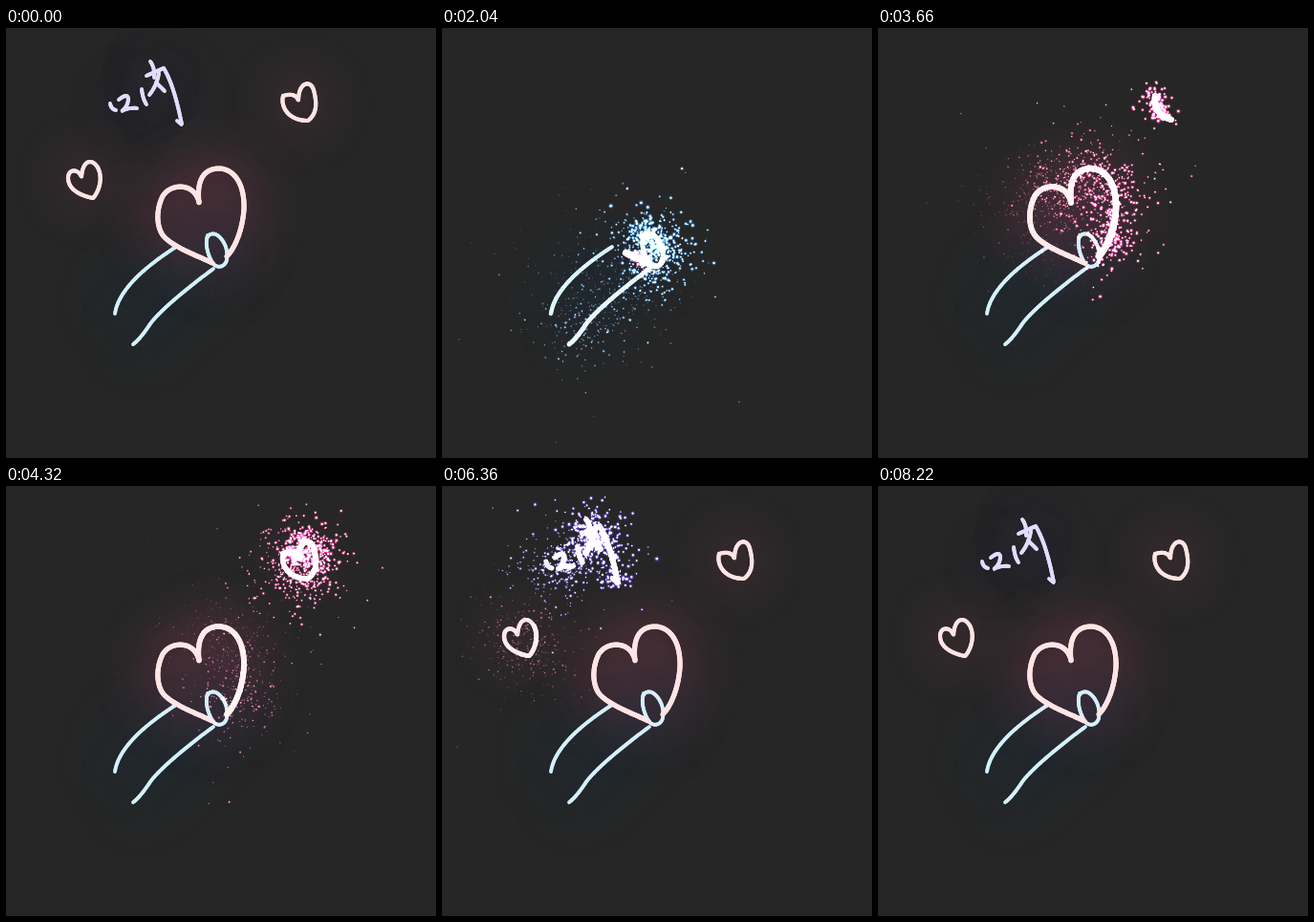
Recreate the animation shown at these times as an HTML page with a canvas. Size 450 by 450 pixels, loop 8340 ms.

```html
<!DOCTYPE html>
<html>
<head>
<meta charset="utf-8">
<style>
html, body { margin: 0; height: 100%; overflow: hidden; background: #262626; }
canvas { display: block; }
</style>
</head>
<body>
<canvas id="stage" width="450" height="450"></canvas>
<script>
const SIZE = 450, LOOP = 8340, STEP = 60, SETTLE = 1800, RATE = 0.95;
const ctx = document.getElementById('stage').getContext('2d');

// ink: settled line colour, glow: soft aura, spark: particle tint
const arm = { ink: [211, 240, 251], glow: 'rgb(10,50,80)', aura: 9, spark: '60,155,255', width: 3.8 };
const heart = { ink: [255, 228, 229], glow: 'rgb(255,90,145)', aura: 6.2, spark: '255,50,135', width: 5.2 };
const small = { ...heart, aura: 2.8, width: 4.2 };
const word = { ink: [226, 220, 255], glow: 'rgb(70,68,150)', aura: 3, spark: '110,80,255', width: 4 };

// [style, start ms, end ms, path]
const strokes = [
  [arm, 330, 690, 'M178,229 C150,247 118,272 114,299'],
  [arm, 700, 1100, 'M217,252 C195,268 160,296 150,311 Q140,326 133,331'],
  [arm, 1140, 1860, 'M211,217 C208,226 211,238 217,247 C222,252 229,250 231,243 C233,232 228,221 220,216 Q213,214 211,219'],
  [heart, 1920, 3380, 'M216,246 C200,238 176,230 165,218 C157,208 157,190 164,176 C172,163 192,163 199,175 Q202,180 202,183 C200,165 203,148 222,147 C240,147 250,165 249,190 C247,215 238,232 231,239'],
  [small, 3440, 4320, 'M290,71 C287,83 296,97 316,97 C325,90 326,80 322,65 C319,54 306,56 306,76 Q303,67 290,71'],
  [small, 4500, 5260, 'M96,146 C90,136 80,138 79,156 C76,147 65,147 65,157 C65,168 76,175 91,178 C97,172 102,157 96,146'],
  [word, 5400, 5480, 'M109,79 Q110,85 115,86'],
  [word, 5520, 5740, 'M118,75 Q128,67 128,75 Q127,83 121,87 Q128,83 137,84'],
  [word, 5780, 5860, 'M142,64 Q143,74 147,80'],
  [word, 5880, 5960, 'M151,35 Q156,42 155,52'],
  [word, 5980, 6180, 'M147,50 L165,42 Q176,60 184,101 L179,97'],
  [word, 6190, 6260, 'M160,47 Q158,60 150,70'],
  [word, 6270, 6330, 'M157,57 L166,66']
].map(makeStroke);

let seed = 7;
function random() {
  seed = (seed * 16807) % 2147483647;
  return seed / 2147483647;
}
const clamp = v => Math.max(0, Math.min(1, v));

function makeCanvas(size) {
  const c = document.createElement('canvas');
  c.width = c.height = size;
  return c.getContext('2d');
}

function makeStroke([style, start, end, d]) {
  const path = document.createElementNS('http://www.w3.org/2000/svg', 'path');
  path.setAttribute('d', d);
  const length = path.getTotalLength();
  const at = u => path.getPointAtLength(u * length);
  const count = Math.ceil(length / 2);
  const points = Array.from({ length: count + 1 }, (_, i) => at(i / count));
  const g = makeCanvas(SIZE);
  g.filter = 'blur(28px)';
  g.strokeStyle = style.glow;
  g.lineWidth = style.aura;
  g.stroke(new Path2D(d));
  return { style, start, end, at, points, aura: g.canvas };
}

function makeSprite(rgb) {
  const g = makeCanvas(32);
  const fill = g.createRadialGradient(16, 16, 0, 16, 16, 16);
  fill.addColorStop(0, `rgba(${rgb},1)`);
  fill.addColorStop(0.45, `rgba(${rgb},0.55)`);
  fill.addColorStop(1, `rgba(${rgb},0)`);
  g.fillStyle = fill;
  g.fillRect(0, 0, 32, 32);
  return g.canvas;
}
const sprites = new Map([arm, heart, small, word].map(s => [s, makeSprite(s.spark)]));

const sparks = strokes.flatMap(s => {
  const count = Math.round((s.end - s.start) * RATE);
  return Array.from({ length: count }, (_, i) => {
    const u = (i + random()) / count;
    const angle = random() * 2 * Math.PI;
    const reach = -19 * Math.log(random() * random());
    const { x, y } = s.at(u);
    return {
      x, y,
      dx: Math.cos(angle) * reach,
      dy: Math.sin(angle) * reach,
      born: s.start + u * (s.end - s.start),
      life: 1350 + 500 * random(),
      size: 0.5 + 0.6 * random(),
      sprite: sprites.get(s.style)
    };
  });
});

function drawStroke(s, t) {
  const { points, style } = s, last = points.length - 1;
  for (let i = 0; i < last; i++) {
    const age = t - s.start - (s.end - s.start) * i / last;
    if (age < 0) break;
    const settled = clamp(age / SETTLE);
    ctx.strokeStyle = `rgb(${style.ink.map(c => Math.round(255 + (c - 255) * settled))})`;
    ctx.lineWidth = style.width + 2 * (1 - settled);
    ctx.beginPath();
    ctx.moveTo(points[i].x, points[i].y);
    ctx.lineTo(points[i + 1].x, points[i + 1].y);
    ctx.stroke();
  }
}

function drawSpark(p, t) {
  const age = t - p.born;
  if (age < 0 || age >= p.life) return;
  const left = 1 - age / p.life;
  const travel = 1 - Math.exp(-age / 650);
  const x = p.x + p.dx * travel, y = p.y + p.dy * travel;
  const size = (1.8 + 4.6 * left) * p.size;
  ctx.globalAlpha = Math.min(1, 1.3 * left ** 1.2);
  ctx.drawImage(p.sprite, x - size / 2, y - size / 2, size, size);
  const core = (0.7 + 1.2 * left) * p.size;
  ctx.globalAlpha = Math.min(1, 1.4 * left ** 1.2);
  ctx.fillRect(x - core / 2, y - core / 2, core, core);
}

function draw(t) {
  ctx.globalCompositeOperation = 'source-over';
  ctx.globalAlpha = 1;
  ctx.fillStyle = '#262626';
  ctx.fillRect(0, 0, SIZE, SIZE);
  for (const s of strokes) {
    ctx.globalAlpha = clamp((t - s.start) / 1800);
    ctx.drawImage(s.aura, 0, 0);
  }
  ctx.globalAlpha = 1;
  ctx.lineCap = 'round';
  for (const s of strokes) drawStroke(s, t);
  ctx.globalCompositeOperation = 'lighter';
  ctx.fillStyle = '#fff';
  for (const p of sparks) drawSpark(p, t);
}

const origin = performance.now();
function tick() {
  const now = Math.max(0, performance.now() - origin) % LOOP;
  const t = Math.floor(now / STEP) * STEP;
  draw(t < STEP ? LOOP : t); // the finished picture opens the loop
  requestAnimationFrame(tick);
}
tick();
</script>
</body>
</html>
```
